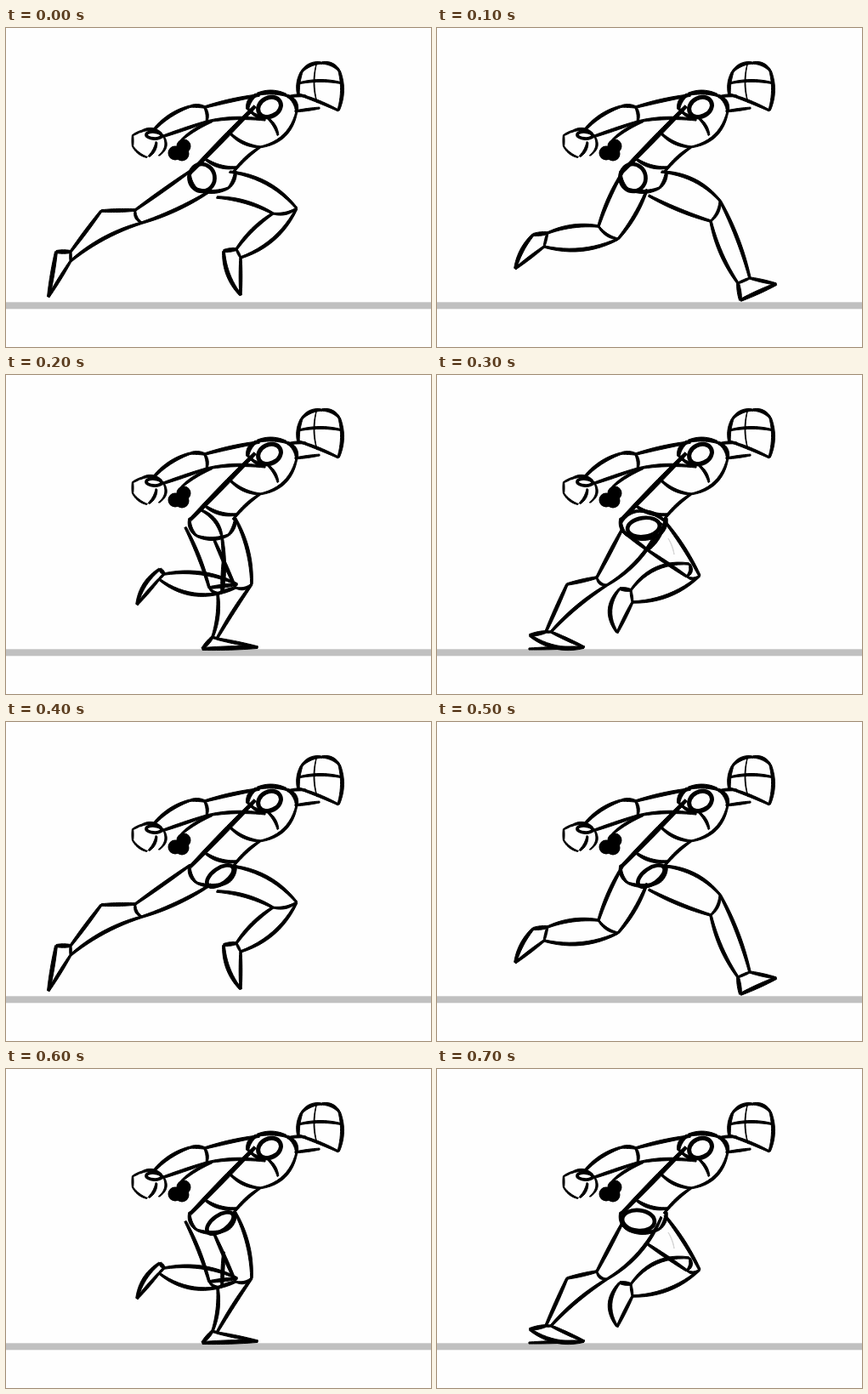
An HTML page for the animation above (800 ms loop, 500 px wide and 375 px high).

```html
<!DOCTYPE html>
<html lang="en">
<head>
<meta charset="utf-8">
<title>Run cycle</title>
<style>
html, body { margin: 0; width: 100%; height: 100%; overflow: hidden; background: #fefefe; }
svg { display: block; width: 100vw; height: 100vh; }
</style>
</head>
<body>
<svg id="stage" viewBox="0 0 500 375">
  <rect y="322.3" width="500" height="8" fill="#c0c0c0"/>
</svg>
<script>
const NS = 'http://www.w3.org/2000/svg';
const stage = document.getElementById('stage');
const STEP = 100;
const INK = 4.7;

function add(parent, tag, attrs = {}) {
  const el = document.createElementNS(NS, tag);
  for (const key in attrs) el.setAttribute(key, attrs[key]);
  return parent.appendChild(el);
}

// One brush mark from a to b, bowed sideways and thinner at its ends
function mark(parent, a, b, bow, width, color) {
  const dx = b[0] - a[0], dy = b[1] - a[1], len = Math.hypot(dx, dy);
  const nx = dy / len, ny = -dx / len;
  const left = [], right = [];
  for (let i = 0; i <= 12; i++) {
    const t = i / 12, arc = 4 * t * (1 - t);
    const half = (width * (0.75 + 0.3 * arc) - 1) / 2;
    const at = k => `${a[0] + dx * t + nx * (bow * arc + k)},${a[1] + dy * t + ny * (bow * arc + k)}`;
    left.push(at(half));
    right.unshift(at(-half));
  }
  add(parent, 'polygon', {
    points: left.concat(right).join(' '),
    fill: color, stroke: color, 'stroke-width': 1, 'stroke-linejoin': 'round'
  });
}

const parse = text => text.split(' ').map(p => p.split(',').map(Number));

// "x,y x,y,bow ...": each point may carry the bow of the mark that ends there
function line(parent, points, width = INK, color = '#000') {
  const pts = typeof points === 'string' ? parse(points) : points;
  pts.slice(1).forEach((p, i) => mark(parent, pts[i], p, p[2] || 0, width, color));
}

function ring(parent, cx, cy, rx, ry, turn, width = INK) {
  add(parent, 'ellipse', {
    cx, cy, rx, ry, fill: 'none', stroke: '#000', 'stroke-width': width,
    transform: `rotate(${turn} ${cx} ${cy})`
  });
}

// Shin and calf outlines run hip, knee, ankle; foot is heel, toe
function leg(parent, { shin, calf, foot }) {
  const front = parse(shin), back = parse(calf), [heel, toe] = parse(foot);
  const ankle = front.at(-1).slice(0, 2), tendon = back.at(-1).slice(0, 2);
  line(parent, front);
  line(parent, back);
  line(parent, [back[1], [...front[1].slice(0, 2), -3]], 4);
  line(parent, [tendon, ankle], 3.6);
  line(parent, [ankle, toe.slice(0, 2)], 4.4);
  line(parent, [tendon, heel, toe], 5.2);
}

function drawHead() {
  line(stage, '344,79 348,51,2 371,41,3 392,50,3 391,97,4');
  line(stage, '391,97 344,78,-1', 4);
  line(stage, '344,65 396,65,3', 3.8);
  line(stage, '365,43 366,88,-3', 1.8);
  line(stage, '331,81 353,80,1', 3.8);
  line(stage, '340,98 369,94', 3.8);
}

function drawTorso() {
  line(stage, '284,96 295,78,3 330,79,3 342,99,4', 5.6);
  line(stage, '284,94 320,98,-9');
  ring(stage, 310, 93, 14, 11, -28, 5);
  line(stage, '342,98 299,140,10 267,170,-2', 4.2);
  line(stage, '262,122 299,140,-4', 4.2);
  line(stage, '308,106 320,126,2', 4);
  line(stage, '293,92 217,170', 6);
  line(stage, '233,153 271,164,-4');
  line(stage, '216,168 224,189,-3 262,188,-4 270,168,-2');
}

function drawArms() {
  line(stage, '172,122 217,92,4 234,93,1 298,79,1');
  line(stage, '180,129 236,110 305,108,3', 4.2);
  line(stage, '233,92 236,110,2', 4);
  line(stage, '206,132 242,110,2', 4);
  line(stage, '159,121 149,126 149,139 166,152,-2', 3);
  line(stage, '158,122 183,124,4', 4);
  line(stage, '184,125 180,150,6', 3.2);
  line(stage, '177,134 168,151,2', 4);
  ring(stage, 174, 126, 9, 4, 4, 3.8);
  [[199, 147], [207, 148], [209, 139]].forEach(([cx, cy]) => add(stage, 'circle', { cx, cy, r: 8.5 }));
}

const stride = [
  { shin: '241,191 160,229,3 76,274,-5', calf: '217,168 152,214 112,215 76,263', foot: '59,263 50,316' },
  { shin: '263,169 342,212,9 276,270,9', calf: '248,199 314,218,4 271,260,-3', foot: '256,262 276,314,-5' }
];
const landing = [
  { shin: '247,190 213,248,3 126,257,8', calf: '218,170 190,233,-2 130,241,-4', foot: '113,243 92,283,-3' },
  { shin: '264,169 333,203,8 368,294,3', calf: '249,197 322,227,-2 354,300,-4', foot: '357,320 399,301' }
];
const passing = [
  { shin: '256,215 254,256 180,240,9', calf: '211,179 239,250,2 272,246 186,234,-7', foot: '181,228 154,270,-5' },
  { shin: '270,169 289,246,5 248,310,-1', calf: '245,194 270,250 249,257 243,308,3', foot: '231,322 296,320' }
];
const push = [
  { shin: '264,174 200,247,8 134,302,-3', calf: '218,181 188,238 153,246 128,302', foot: '109,306 173,320,-7' },
  { shin: '268,172 309,236,2 230,267,8', calf: '248,206 294,237 297,222,-3 228,253,-11', foot: '215,251 212,303,-10' }
];

const circle = [230.5, 176, 15, 16, -8];
const leaf = [252, 181, 18, 9, -35];

// Which leg is nearer swaps halfway through, shown by the hip
const poses = [
  { legs: stride, hip: circle },
  { legs: landing, hip: circle },
  { legs: passing, near: '230,159 254,190,5 255,255,2' },
  { legs: push, hip: [243, 179, 19, 11, -8], near: '216,175 240,160,5 268,172,3 248,206,3 219,184' },
  { legs: stride, hip: leaf },
  { legs: landing, hip: leaf },
  { legs: passing, hip: leaf },
  { legs: push, hip: [237, 178, 19, 12, 6] }
].map(({ legs, hip, near }) => {
  const g = add(stage, 'g');
  legs.forEach(part => leg(g, part));
  if (hip) ring(g, ...hip);
  if (near) line(g, near);
  if (legs === push) {
    line(g, '108,322 173,320', 4);
    line(g, '272,192 279,211,1', 1.4, '#d5d5d5');
  }
  return g;
});

drawHead();
drawTorso();
drawArms();

function draw(time) {
  const now = Math.floor(time / STEP) % poses.length;
  poses.forEach((g, i) => g.setAttribute('display', i === now ? 'inline' : 'none'));
}

const start = performance.now();
function tick() {
  draw(performance.now() - start);
  requestAnimationFrame(tick);
}
tick();
</script>
</body>
</html>
```
